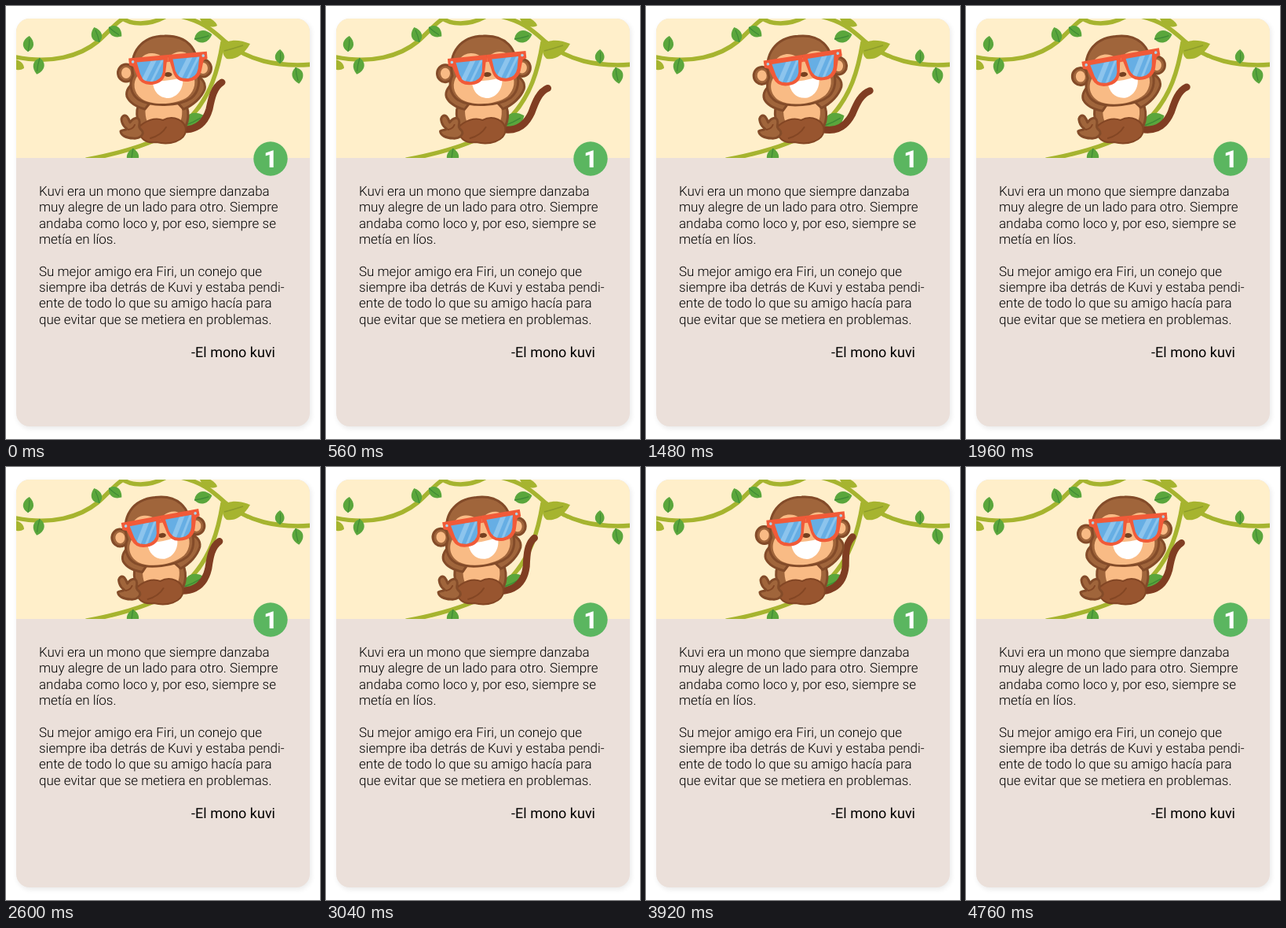
An HTML page for the animation above (4800 ms loop, 400 by 550 pixels).

```html
<!DOCTYPE html>
<html lang="es">
<head>
<meta charset="utf-8">
<title>El mono Kuvi</title>
<style>
html, body { margin: 0; width: 100%; height: 100%; overflow: hidden; background: #fff; }
svg { display: block; width: 100%; height: 100%; }
text { font-family: Roboto, sans-serif; font-size: 17px; text-rendering: geometricPrecision; }
.vine { fill: none; stroke: #a6b42f; stroke-width: 5.5; stroke-linecap: round; }
.fur { fill: #a0653b; stroke: #834b29; stroke-width: 3; stroke-linejoin: round; }
.skin { fill: #f9bb85; }
.leg { fill: #98552f; stroke: #834624; stroke-width: 2; stroke-linejoin: round; }
.line { fill: none; stroke: #834624; stroke-width: 2; stroke-linecap: round; }
</style>
</head>
<body>
<svg viewBox="0 0 400 550" xmlns="http://www.w3.org/2000/svg">
  <defs>
    <clipPath id="card"><rect x="13" y="16" width="374" height="518" rx="17"/></clipPath>
    <clipPath id="scene"><rect x="13" y="16" width="374" height="177"/></clipPath>
    <path id="lens" d="M6 0 H40 L37 15 Q34 26 23 26 Q11 26 8 15 Z"/>
    <clipPath id="lensClip"><use href="#lens"/></clipPath>
    <filter id="soft" x="-10%" y="-10%" width="120%" height="120%"><feGaussianBlur stdDeviation="3"/></filter>
    <g id="leaf">
      <path d="M0 0 C-9 -5 -9 -15 2 -21 C10 -13 9 -4 0 0Z" fill="#5aa63c"/>
      <path d="M0 0 Q2 -9 2 -17" fill="none" stroke="#3f8a35" stroke-width="1.2"/>
    </g>
    <g id="glass">
      <path d="M0 -6 H50 V3 L45 5 L41 18 Q37 30 23 30 Q8 30 5 17 L2 3 H0 Z" fill="#f15a38"/>
      <use href="#lens" fill="#66aee4"/>
    </g>
    <g id="shine" clip-path="url(#lensClip)" stroke="#8cc4ed">
      <path d="M9 30 L30 -4" stroke-width="6"/>
      <path d="M19 32 L40 -2" stroke-width="3"/>
    </g>
  </defs>

  <rect x="14" y="18" width="375" height="519" rx="18" fill="#000" opacity=".08" filter="url(#soft)"/>
  <g clip-path="url(#card)">
    <rect x="13" y="16" width="374" height="518" fill="#ebe0da"/>
    <rect x="13" y="16" width="374" height="177" fill="#ffefca"/>
  </g>

  <g clip-path="url(#scene)">
    <g clip-path="url(#card)">
      <path class="vine" d="M8 64 C58 75 95 63 117 45 C133 31 140 20 156 12"/>
      <path class="vine" d="M145 13 C158 25 183 25 204 13"/>
      <path class="vine" d="M218 12 C251 19 263 31 279 45 C308 69 344 78 392 74"/>
      <path class="vine" d="M276 46 C270 83 260 114 237 139 C206 170 160 184 103 195"/>
      <path d="M8 68 C15 67 23 72 23 79 C17 83 12 81 8 78Z" fill="#a6b42f"/>
      <path d="M246 13 C253 12 267 17 269 25 C260 29 249 25 246 13Z" fill="#a6b42f"/>
      <path d="M276 50 C283 42 296 42 311 48 C303 62 292 69 281 67 C276 63 275 56 276 50Z" fill="#a6b42f"/>
      <path d="M278 57 Q290 54 302 50" fill="none" stroke="#8d9c2b" stroke-width="1.5"/>
      <g id="leaves"></g>
    </g>

    <path id="tail" d="M224 157 C243 158 254 148 259 131 C262 116 265 103 275 97" fill="none" stroke="#803d22" stroke-width="9" stroke-linecap="round"/>

    <g id="body">
      <path class="fur" d="M174 118 C164 128 164 146 176 159 L222 162 C234 151 236 131 224 117Z"/>
      <path class="skin" d="M180 119 C176 130 177 141 181 150 H221 C226 139 225 127 220 119Z"/>
      <path class="leg" d="M168 155 C178 145 190 141 200 145 C213 138 229 145 229 158 C228 172 208 177 192 173 C178 175 169 168 168 155Z"/>
      <path class="line" d="M184 168 Q198 164 204 154"/>
      <path class="fur" d="M149 140 C153 137 156 142 158 148 C162 142 169 140 170 146 C171 151 167 153 173 158 C177 163 170 169 162 168 C153 168 146 164 146 159 C149 157 153 158 154 156 C148 152 145 143 149 140Z"/>
      <path class="line" d="M156 157 Q162 156 164 151"/>
    </g>

    <g id="head">
      <g class="fur">
        <path d="M166 96 C157 100 152 108 154 115 C157 122 166 128 177 131 L186 120Z"/>
        <path d="M240 88 C250 91 255 98 253 106 C249 116 239 126 226 131 L216 120Z"/>
        <ellipse cx="153" cy="85" rx="10.5" ry="11"/>
        <ellipse cx="251" cy="79" rx="10.5" ry="11"/>
      </g>
      <g class="skin">
        <ellipse cx="153" cy="85" rx="6" ry="7"/>
        <ellipse cx="251" cy="79" rx="6" ry="7"/>
      </g>
      <path class="fur" d="M162 88 C156 58 174 38 202 38 C230 37 246 54 243 82 C248 95 246 109 236 117 C220 128 184 128 169 119 C159 112 156 99 162 88Z"/>
      <path class="skin" d="M168 88 C165 73 172 61 184 60 C194 59 199 65 204 68 C211 61 218 56 228 59 C238 63 239 75 237 84 C243 95 241 107 232 115 C217 126 187 127 173 118 C162 110 161 97 168 88Z"/>
      <ellipse cx="206.5" cy="87" rx="5" ry="3" fill="#76401f"/>
      <path d="M187 95 Q206 96 225 91 C227 104 219 116 207 117 C195 117 187 108 187 95Z" fill="#fff"/>
      <g transform="translate(206.5 68) rotate(-5)">
        <use href="#glass"/>
        <use href="#glass" transform="scale(-1 1)"/>
        <use href="#shine"/>
        <use href="#shine" transform="translate(-46 0)"/>
        <circle cx="-45" cy="-1" r="1.8" fill="#a9d3e8"/>
        <circle cx="45" cy="-1" r="1.8" fill="#a9d3e8"/>
      </g>
    </g>
  </g>

  <circle cx="337" cy="194" r="21.7" fill="#5bb660"/>
  <text x="337" y="205" text-anchor="middle" fill="#fff" style="font-size:30.5px;font-weight:900">1</text>
  <g id="story" font-weight="300"></g>
  <text x="343" y="446" text-anchor="end" style="font-size:18px">-El mono kuvi</text>
</svg>
<script>
const NS = 'http://www.w3.org/2000/svg';
const LOOP = 4800, STEP = 40;
const byId = id => document.getElementById(id);

function add(parent, tag, attrs, text) {
  const el = document.createElementNS(NS, tag);
  for (const key in attrs) el.setAttribute(key, attrs[key]);
  if (text) el.textContent = text;
  byId(parent).append(el);
}

// x, y, angle, size
[[28, 58, 0, 0.95], [43, 66, 185, 1], [119, 46, -25, 0.95], [131, 27, 120, 0.95],
 [240, 42, 70, 1.1], [227, 152, 58, 1.35], [162, 181, 180, 1.1],
 [349, 73, -5, 0.85], [369, 78, 163, 1]
].forEach(([x, y, a, s]) => add('leaves', 'use', {
  href: '#leaf', transform: `translate(${x} ${y}) rotate(${a}) scale(${s})`
}));

['Kuvi era un mono que siempre danzaba',
 'muy alegre de un lado para otro. Siempre',
 'andaba como loco y, por eso, siempre se',
 'metía en líos.',
 '',
 'Su mejor amigo era Firi, un conejo que',
 'siempre iba detrás de Kuvi y estaba pendi-',
 'ente de todo lo que su amigo hacía para',
 'que evitar que se metiera en problemas.'
].forEach((line, i) => add('story', 'text', { x: 42, y: 241 + i * 20.35 }, line));

const head = byId('head'), body = byId('body'), tail = byId('tail');

function draw(ms) {
  const phase = Math.floor(ms % LOOP / STEP) * STEP / LOOP * 2 * Math.PI;
  const sway = (1 - Math.cos(phase)) / 2;
  head.setAttribute('transform', `translate(${-5.6 * sway} 0) rotate(${-5.5 * sway} 204 110)`);
  body.setAttribute('transform', `translate(${-3.5 * sway} 0)`);
  tail.setAttribute('transform', `rotate(${12.5 * Math.sin(phase)} 228 152)`);
}

const start = performance.now();
function tick() {
  draw(performance.now() - start);
  requestAnimationFrame(tick);
}
tick();
</script>
</body>
</html>
```
